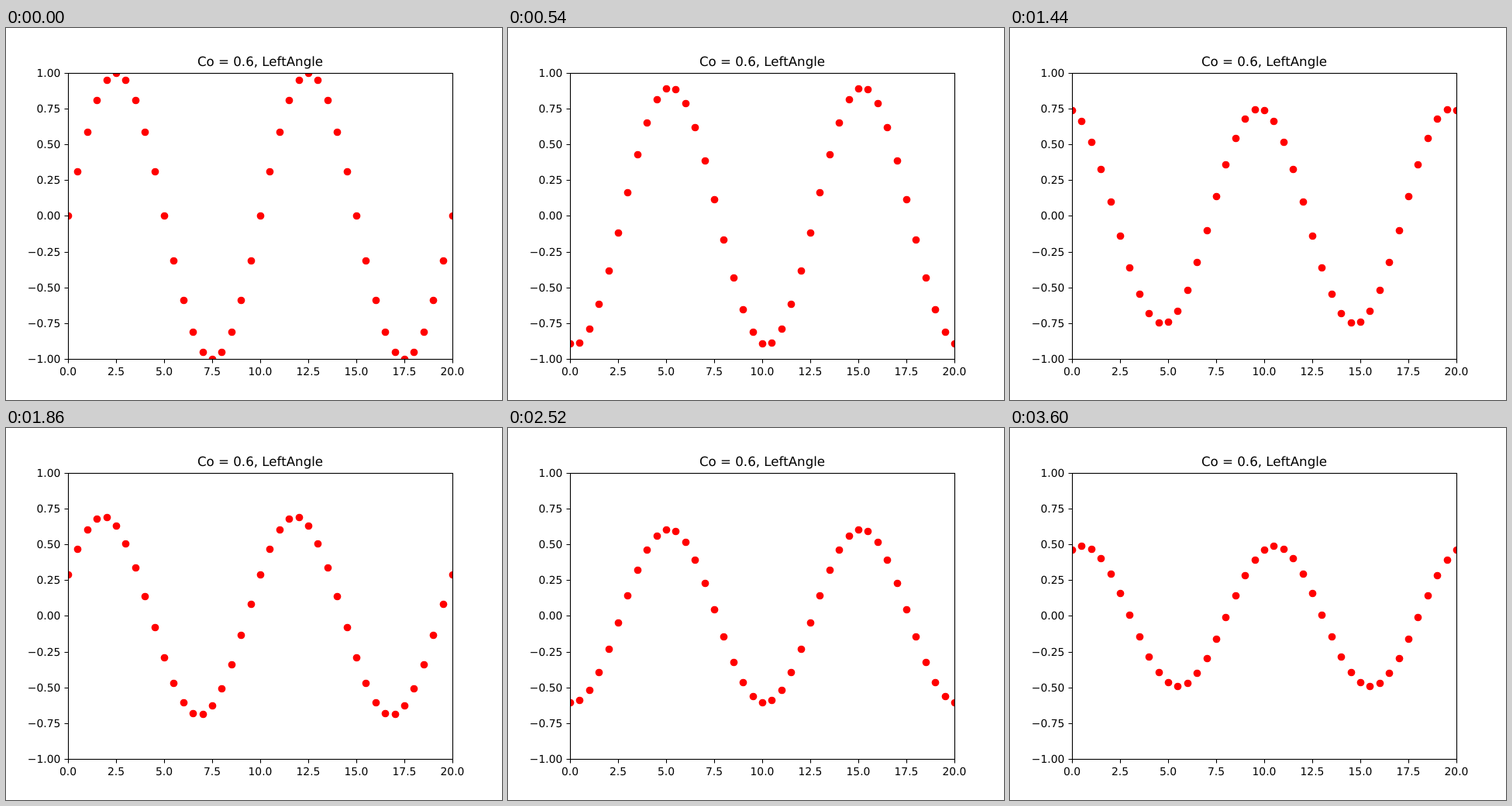
An HTML page for the animation above (3660 ms loop, 640 by 480 pixels).

```html
<!DOCTYPE html>
<html lang="en">
<head>
<meta charset="utf-8">
<title>Upwind advection</title>
<style>
  html, body { margin: 0; width: 640px; height: 480px; overflow: hidden; background: #fff; }
  svg { display: block; }
  text { font: 13.889px "DejaVu Sans", sans-serif; text-rendering: geometricPrecision; }
  .title { font-size: 16.667px; }
  .axes { fill: none; stroke: #000; stroke-width: 1.111; }
  .dots { fill: #f00; }
</style>
</head>
<body>
<svg id="plot" width="640" height="480" viewBox="0 0 640 480">
  <clipPath id="area"><rect x="80" y="58" width="496" height="369"/></clipPath>
</svg>
<script>
const STEP_MS = 60, STEPS = 61, POINTS = 41;
const COURANT = 0.6, ANGLE = Math.PI / 10;

// Each upwind step multiplies the wave by g = 1 - c + c * exp(-i * angle).
const re = 1 - COURANT + COURANT * Math.cos(ANGLE);
const im = COURANT * Math.sin(ANGLE);
const damping = Math.hypot(re, im);
const lag = Math.atan2(im, re);

const plot = document.getElementById('plot');
const px = x => 80 + x * 24.8;
const py = y => 242.4 - y * 184.8;
const snap = v => Math.floor(v + 0.5) + 0.5;

function add(parent, tag, attrs, text) {
  const el = document.createElementNS('http://www.w3.org/2000/svg', tag);
  for (const key in attrs) el.setAttribute(key, attrs[key]);
  if (text) el.textContent = text;
  return parent.appendChild(el);
}

const dotLayer = add(plot, 'g', { class: 'dots', 'clip-path': 'url(#area)' });
const dots = Array.from({ length: POINTS }, (_, i) =>
  add(dotLayer, 'circle', { cx: snap(px(i / 2)), r: 4.861 }));

let ticks = '';
for (let i = 0; i <= 8; i++) {
  const xv = i * 2.5, yv = i / 4 - 1;
  const x = snap(px(xv)), y = snap(py(yv));
  ticks += `M${x} 427.5v5M80.5 ${y}h-5`;
  add(plot, 'text', { x: px(xv), y: 448, 'text-anchor': 'middle' }, xv.toFixed(1));
  add(plot, 'text', { x: 70.3, y: y + 4.5, 'text-anchor': 'end' },
    yv.toFixed(2).replace('-', '\u2212'));
}
add(plot, 'path', { class: 'axes', d: ticks });
add(plot, 'rect', { class: 'axes', x: 80.5, y: 58.5, width: 496, height: 369 });
add(plot, 'text', { class: 'title', x: 328, y: 49, 'text-anchor': 'middle' },
  'Co = 0.6, LeftAngle');

function show(step) {
  const amp = damping ** step;
  dots.forEach((dot, i) =>
    dot.setAttribute('cy', snap(py(amp * Math.sin(i * ANGLE - step * lag)))));
}

let start;
function tick(now) {
  start ??= now;
  show(Math.floor((now - start) / STEP_MS) % STEPS);
  requestAnimationFrame(tick);
}
show(0);
requestAnimationFrame(tick);
</script>
</body>
</html>
```
